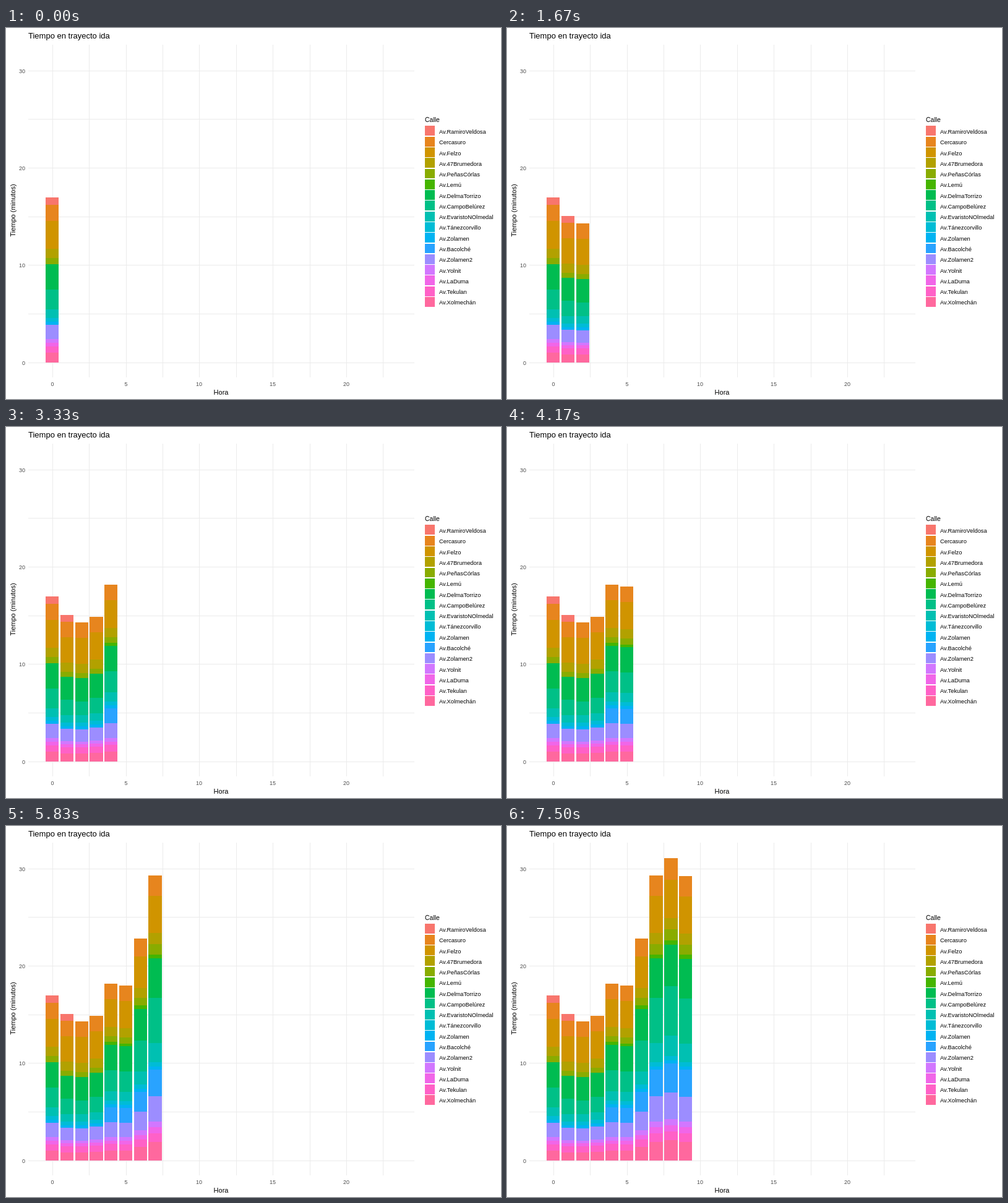
An HTML page for the animation above (8 s loop, 800 by 600 pixels).

```html
<!DOCTYPE html>
<html lang="es">
<head>
<meta charset="utf-8">
<title>Tiempo en trayecto ida</title>
<style>
  html, body { margin: 0; width: 100%; height: 100%; overflow: hidden; background: #fff; }
  svg { display: block; width: 800px; height: 600px; font-family: "Liberation Sans", Arial, sans-serif; }
</style>
</head>
<body>
<svg id="stage" viewBox="0 0 800 600"></svg>
<script>
const LOOP = 8000, BASE = 541;
const svg = document.getElementById('stage');

// Bar height per hour, in px.
const totals = [267, 237, 225, 234, 286, 283, 359, 461, 489, 460];
const quiet = Math.min(...totals), busy = Math.max(...totals);

// Legend order: name, colour, share on quiet and on busy roads, first and last hour of use.
const streets = [
  ['Av.RamiroVeldosa', '#F8766D', 12, 12, 0, 1],
  ['Cercasuro', '#E7851E', 25, 34],
  ['Av.Felzo', '#D09400', 43, 61],
  ['Av.47Brumedora', '#B2A100', 15.5, 18],
  ['Av.PeñasCórlas', '#89AC00', 8, 17],
  ['Av.Lemú', '#45B500', 4, 7, 4],
  ['Av.DelmaTorrizo', '#00BC51', 38, 66],
  ['Av.CampoBelúrez', '#00C087', 23, 78],
  ['Av.EvaristoNOlmedal', '#00C0B2', 12, 32],
  ['Av.Tánezcorvillo', '#00BCD6', 6, 7],
  ['Av.Zolamen', '#00B3F2', 5, 5],
  ['Av.Bacolché', '#29A3FF', 20, 46, 4],
  ['Av.Zolamen2', '#9C8DFF', 20, 42],
  ['Av.Yolnit', '#D277FF', 5, 10],
  ['Av.LaDuma', '#F166E8', 5, 10],
  ['Av.Tekulan', '#FF61C7', 10, 14],
  ['Av.Xolmechán', '#FF689E', 13, 32]
];

function add(tag, attrs, parent = svg) {
  const el = document.createElementNS('http://www.w3.org/2000/svg', tag);
  for (const key in attrs) el.setAttribute(key, attrs[key]);
  return parent.appendChild(el);
}

// Fills whole pixels between rounded edges.
function box(left, top, right, bottom, fill, parent) {
  const [x, y, x2, y2] = [left, top, right, bottom].map(Math.round);
  add('rect', { x, y, width: x2 - x, height: y2 - y, fill, 'shape-rendering': 'crispEdges' }, parent);
}

function text(str, x, y, size, attrs) {
  add('text', { x, y, 'font-size': size, fill: '#000', ...attrs }).textContent = str;
}

function drawGrid() {
  const grey = '#EBEBEB', tick = '#4D4D4D';
  for (let k = 0; k < 7; k++) {
    const y = Math.floor(541.3 - 78.7 * k);
    box(36, y, 660, y + 1, grey);
    if (k % 2 === 0) text(k * 5, 31, y + 4, 9, { fill: tick, 'text-anchor': 'end' });
  }
  for (let k = 0; k < 10; k++) {
    const x = Math.round(74.71 + 59.4 * k);
    box(x, 27, x + 1, 565, grey);
    if (k % 2 === 0) text(k * 2.5, x, 579, 9, { fill: tick, 'text-anchor': 'middle' });
  }
}

function drawLabels() {
  text('Tiempo en trayecto ida', 36, 17, 13);
  text('Hora', 347.5, 593, 11, { 'text-anchor': 'middle' });
  text('Tiempo (minutos)', 0, 0, 11, {
    'text-anchor': 'middle', transform: 'translate(15 295) rotate(-90)'
  });
  text('Calle', 677, 152, 10.5);
  streets.forEach(([name, color], i) => {
    const y = 158.45 + 17.28 * i;
    box(677, y, 693, y + 15.9, color);
    text(name, 700, Math.round(y + 12.5), 9.3);
  });
}

// Street heights for one hour: blended by traffic, then scaled to the total.
function split(hour) {
  const load = (totals[hour] - quiet) / (busy - quiet);
  const parts = streets.map(([, , low, high, from = 0, to = Infinity]) =>
    hour >= from && hour <= to ? low + (high - low) * load : 0);
  const sum = parts.reduce((a, b) => a + b);
  return parts.map(part => part * totals[hour] / sum);
}

function drawBar(hour) {
  const group = add('g', {});
  const shift = 23.77 * hour;
  let y = BASE - totals[hour];
  split(hour).forEach((height, i) => {
    if (height) box(64.1 + shift, y, 85.35 + shift, y + height, streets[i][1], group);
    y += height;
  });
  return group;
}

drawGrid();
drawLabels();
const bars = totals.map((_, hour) => drawBar(hour));

// Six hours appear every five seconds, on 10 ms ticks.
const startOf = hour => Math.round(hour * 250 / 3) * 10;

function render(time) {
  bars.forEach((bar, hour) => {
    bar.setAttribute('visibility', time >= startOf(hour) ? 'visible' : 'hidden');
  });
}

const origin = performance.now();
function loop() {
  render((performance.now() - origin) % LOOP);
  requestAnimationFrame(loop);
}
render(0);
requestAnimationFrame(loop);
</script>
</body>
</html>
```
